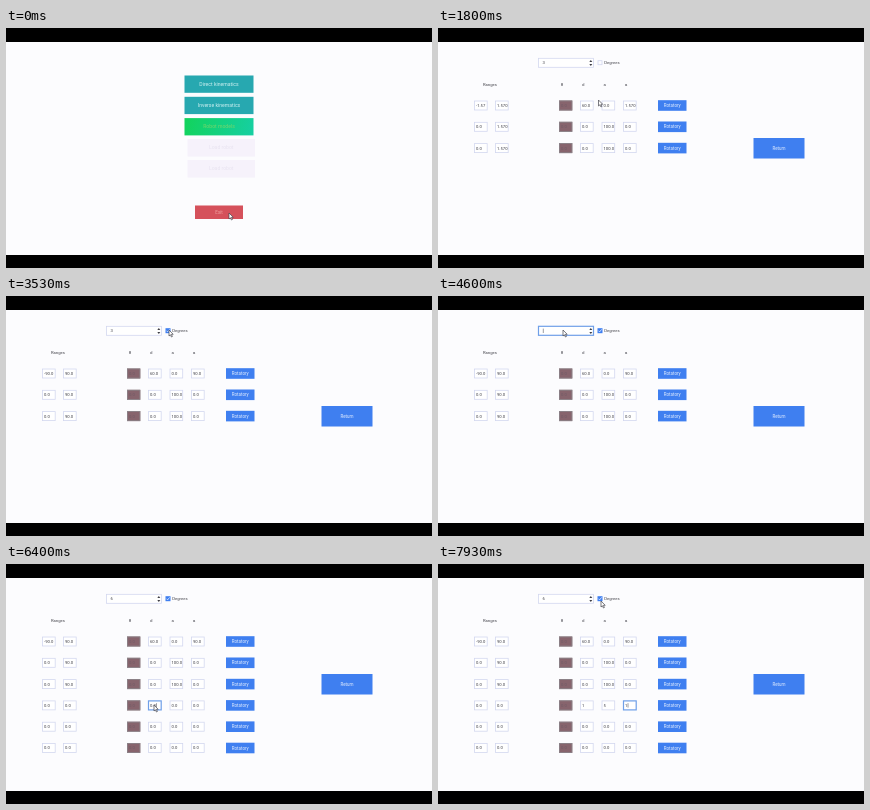
These frames come from a looping animation (426x240 px, 8 s). An HTML page with a canvas:

```html
<!DOCTYPE html>
<html lang="en">
<head>
<meta charset="utf-8">
<title>Joint parameters form</title>
<style>
html, body { margin: 0; width: 100%; height: 100%; overflow: hidden; background: #000; }
canvas { display: block; width: 100vw; height: 100vh; }
</style>
</head>
<body>
<canvas id="stage" width="426" height="240"></canvas>
<script>
const LOOP = 8000, FPS = 15;
const ctx = document.getElementById('stage').getContext('2d');
const INK = '#3e3e46', BLUE = '#3f7ff0', TEAL = '#27a8b0', LINE = '#d3d7ef';
const FORM_AT = 660, DEGREES_AT = 3400, ROWS_AT = 4860;
const ROW_Y = 77.5, ROW_GAP = 21.3;
const COLS = [36, 57, 142, 163.5, 185];

// Pointer stops: time, x, y
const PATH = [
  [0, 223, 185], [150, 223, 180], [470, 218, 79], [1070, 217, 78],
  [1500, 200, 77], [2100, 121, 67], [2600, 121, 67], [3200, 163, 34],
  [3750, 163, 34], [4250, 125, 34], [4900, 125, 34], [5450, 131, 142],
  [5750, 131, 142], [6100, 148, 141], [6700, 148, 141], [7000, 174, 142],
  [7250, 174, 142], [7800, 163, 37], [8000, 163, 37]
];

// Focused control: start, end, column (-1 is the joint count), row
const FOCUS = [
  [4300, 5950, -1, 0], [6150, 6900, 2, 3],
  [6900, 7450, 3, 3], [7450, 8000, 4, 3]
];

const clamp = v => Math.max(0, Math.min(1, v));
const ramp = (t, from, to) => clamp((t - from) / (to - from));
const ease = u => u * u * (3 - 2 * u);

function mix(a, b, u) {
  const part = (c, i) => parseInt(c.slice(i, i + 2), 16);
  return 'rgb(' + [1, 3, 5].map(i =>
    Math.round(part(a, i) + (part(b, i) - part(a, i)) * u)) + ')';
}

function pointer(t) {
  let i = 0;
  while (i < PATH.length - 2 && t >= PATH[i + 1][0]) i++;
  const a = PATH[i], b = PATH[i + 1], u = ease(ramp(t, a[0], b[0]));
  return [a[1] + (b[1] - a[1]) * u, a[2] + (b[2] - a[2]) * u];
}

function rect(x, y, w, h, fill) {
  ctx.fillStyle = fill;
  ctx.fillRect(x, y, w, h);
}

// Draws the text and returns its width
function label(text, x, y, color = INK, size = 4.2, align = 'left') {
  ctx.fillStyle = color;
  ctx.font = size + 'px Roboto, Arial, sans-serif';
  ctx.textAlign = align;
  ctx.fillText(text, x, y + 0.2);
  return ctx.measureText(text).width;
}

function button(text, x, y, w, h, fill, color, size = 4.5) {
  rect(x, y, w, h, fill);
  label(text, x + w / 2, y + h / 2, color, size, 'center');
}

function outline(x, y, w, h, color, width = 0.8) {
  ctx.strokeStyle = color;
  ctx.lineWidth = width;
  ctx.strokeRect(x, y, w, h);
}

function field(text, x, y, w, focused, shown, caret) {
  const left = x + (w > 20 ? 4.5 : 2);
  rect(x, y - 5, w, 10, '#fff');
  ctx.globalAlpha = shown;
  outline(x + 0.5, y - 4.5, w - 1, 9, focused ? '#6f9fe8' : LINE, focused ? 1.2 : 0.8);
  ctx.globalAlpha = 1;
  const width = label(text, left, y);
  if (caret) rect(left + width + 0.4, y - 2.2, 0.5, 4.4, INK);
}

function drawMenu(t) {
  const [, y] = pointer(t);
  const items = ['Direct kinematics', 'Inverse kinematics', 'Robot models'];
  items.forEach((text, i) => {
    const top = 47.5 + i * 21.3;
    const hover = t > 150 ? y >= top && y <= top + 18 : i === 2;
    let fill = TEAL;
    if (hover) {
      fill = ctx.createLinearGradient(178, top, 247, top + 17);
      fill.addColorStop(0, '#12d35b');
      fill.addColorStop(1, '#16cfa2');
    }
    button(text, 178.5, top, 69, 17.3, fill, hover ? '#78d56a' : '#d2f2f2', 5.1);
  });
  [111, 132].forEach(top => button('Load robot', 181.5, top, 67.5, 17.5, '#f6f2fb', '#e8e3f0', 5.1));
  button('Exit', 189, 177.5, 48, 13.5, '#d5515b', '#f0a5a3');
}

function values(row, t) {
  const degrees = t >= DEGREES_AT;
  const quarter = degrees ? '90.0' : '1.570';
  if (row === 0) return [degrees ? '-90.0' : '-1.57', quarter, '60.0', '0.0', quarter];
  if (row < 3) return ['0.0', quarter, '0.0', '100.0', '0.0'];
  const typed = (at, text) => row === 3 && t >= at ? text : '0.0';
  return ['0.0', '0.0', typed(6500, '1'), typed(7300, '5'), typed(7600, '1')];
}

function drawForm(t) {
  const settle = ramp(t, 1100, 1800);
  const shown = 0.2 + 0.8 * settle;
  const focus = FOCUS.find(f => t >= f[0] && t < f[1]);
  const isFocus = (col, row) => !!focus && focus[2] === col && focus[3] === row;
  const blink = !!focus && (t - focus[0]) % 1000 < 500;
  const main = mix('#3a9ca8', BLUE, settle);
  const buttonInk = mix('#a5d2d4', '#e4eeff', settle);

  const counting = isFocus(-1, 0);
  const count = t < 4500 ? '3' : t < 4700 ? '' : '6';
  field(count, 100, 34.8, 56, counting, shown, counting && blink);
  ctx.fillStyle = mix('#c44850', INK, settle);
  [-1, 1].forEach(d => {
    ctx.beginPath();
    ctx.moveTo(151.3, 35 + d);
    ctx.lineTo(154.3, 35 + d);
    ctx.lineTo(152.8, 35 + d * 3);
    ctx.fill();
  });

  if (t >= DEGREES_AT) {
    rect(159.5, 32.2, 5, 5, BLUE);
    ctx.strokeStyle = '#fff';
    ctx.lineWidth = 0.7;
    ctx.beginPath();
    ctx.moveTo(160.5, 34.7);
    ctx.lineTo(161.6, 35.9);
    ctx.lineTo(163.6, 33.4);
    ctx.stroke();
  } else {
    ctx.globalAlpha = shown;
    outline(160, 32.7, 4, 4, LINE);
    ctx.globalAlpha = 1;
  }
  label('Degrees', 166.3, 34.6);

  label('Ranges', 45, 56.3);
  ['θ', 'd', 'a', 'α'].forEach((text, i) => label(text, 124 + i * 21.3, 56.3, INK, 4.4, 'center'));

  const rows = t >= ROWS_AT ? 6 : 3;
  for (let row = 0; row < rows; row++) {
    const y = ROW_Y + row * ROW_GAP;
    values(row, t).forEach((text, col) => {
      const on = isFocus(col, row);
      field(text, COLS[col], y, 13.7, on, shown, on && blink);
    });
    rect(121, y - 5, 13.3, 10, mix('#cf4e58', '#87646d', settle));
    outline(121.4, y - 4.6, 12.5, 9.2, mix('#a58188', '#8b858b', settle));
    label('0.0', 123, y, '#705b66');
    button('Rotatory', 220, y - 5.3, 28.5, 10.6, main, buttonInk);
  }
  button('Return', 315.5, 110, 51, 20.5, main, buttonInk);
}

function drawPointer(t) {
  const [x, y] = pointer(t);
  const shape = [[0, 0], [0, 6], [1.4, 4.8], [2.5, 7], [3.4, 6.5], [2.4, 4.4], [4.2, 4.3]];
  ctx.beginPath();
  shape.forEach(([dx, dy]) => ctx.lineTo(x + dx, y + dy));
  ctx.closePath();
  ctx.fillStyle = '#fff';
  ctx.fill();
  ctx.strokeStyle = '#44444c';
  ctx.lineWidth = 0.7;
  ctx.stroke();
}

function draw(t) {
  rect(0, 0, 426, 240, '#000');
  rect(0, 14, 426, 213, '#fcfcfe');
  ctx.textBaseline = 'middle';
  if (t < FORM_AT) drawMenu(t);
  else drawForm(t);
  drawPointer(t);
}

const start = performance.now();
function tick(now) {
  const t = Math.max(0, now - start) % LOOP;
  draw(Math.floor(t * FPS / 1000 + 0.06) * 1000 / FPS % LOOP);
  requestAnimationFrame(tick);
}
draw(0);
requestAnimationFrame(tick);
</script>
</body>
</html>
```
